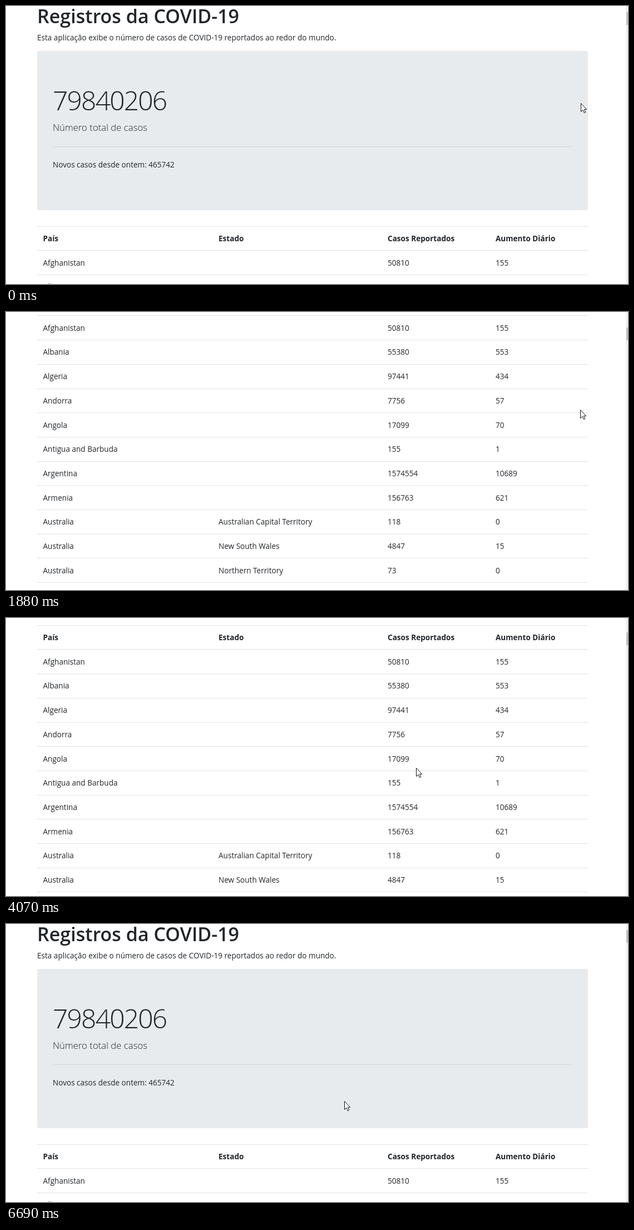
Animation of 1118x501 px, one loop 7320 ms. Source, as an HTML page:

```html
<!DOCTYPE html>
<html lang="pt">
<head>
<meta charset="utf-8">
<title>Registros da COVID-19</title>
<style>
html, body { margin: 0; width: 100%; height: 100%; overflow: hidden; background: #fff; }
svg { display: block; width: 1118px; height: 501px; }
text { font-family: "Open Sans", "Noto Sans", sans-serif; font-size: 13.57px; fill: #212529; white-space: pre; }
.title { font-size: 34px; font-weight: 600; }
.total { font-size: 48px; font-weight: 300; letter-spacing: -1.85px; }
.lead { font-size: 16.75px; font-weight: 300; }
.head { font-weight: 700; }
</style>
</head>
<body>
<svg viewBox="0 0 1118 501">
  <g id="page"></g>
  <rect x="1114" y="0" width="4" height="501" fill="#f1f1f1"/>
  <rect id="thumb" x="1115" width="3" height="23" fill="#c1c1c1"/>
  <path id="cursor" d="M.5 .5V15.5L4 12.2L6.4 17.6L8.7 16.6L6.4 11.3H10.6Z" fill="#fff" stroke="#111"/>
</svg>
<script>
const LOOP = 7320, REPAINT = 77.2;
const ROW = 43.7, TABLE_TOP = 397;
const COLS = [66.5, 382, 686, 880];

const ROWS = `Afghanistan||50810|155
Albania||55380|553
Algeria||97441|434
Andorra||7756|57
Angola||17099|70
Antigua and Barbuda||155|1
Argentina||1574554|10689
Armenia||156763|621
Australia|Australian Capital Territory|118|0
Australia|New South Wales|4847|15
Australia|Northern Territory|73|0
Australia|Queensland|1241|1
Australia|South Australia|569|1
Australia|Tasmania|234|0
Australia|Victoria|20361|0
Australia|Western Australia|854|6
Austria||349055|1851
Azerbaijan||211764|1703
Bahamas||7788|0
Bahrain||91304|234`.split('\n').map(line => line.split('|'));

// Start and number of repaints
const BURSTS = [[630, 6], [1260, 3], [1640, 7], [2280, 10], [3290, 45]];

// Wheel turns: from, till, page offset reached
const TURNS = [[590, 970, 200], [1200, 1410, 270], [1590, 2070, 551], [2210, 2690, 816], [3308, 4727, 0]];

// Pointer stops after the slow drift: time, x, y
const DRIFT_END = 3440;
const STOPS = [
  [DRIFT_END, 1023, 189], [4600, 487, 340], [4760, 477, 340], [5300, 213, 100],
  [5530, 242, 126], [6300, 517, 336], [6680, 608, 319]
];

const $ = id => document.getElementById(id);
const page = $('page');
const mix = (a, b, p) => a + (b - a) * p;
const progress = (t, from, till) => Math.min(1, Math.max(0, (t - from) / (till - from)));

function add(tag, attrs, text = '') {
  const node = document.createElementNS('http://www.w3.org/2000/svg', tag);
  for (const key in attrs) node.setAttribute(key, attrs[key]);
  node.textContent = text;
  page.append(node);
}
const label = (x, y, text, cls = '') => text && add('text', { x, y, class: cls }, text);
const rule = (x, y, width, fill) => add('rect', { x, y: Math.round(y), width, height: 1, fill });

function buildPage() {
  label(56, 31, 'Registros da COVID-19', 'title');
  label(56, 62, 'Esta aplicação exibe o número de casos de COVID-19 reportados ao redor do mundo.');
  add('rect', { x: 56, y: 81, width: 990, height: 287, rx: 4, fill: '#e8ebee' });
  label(84, 188, '79840206', 'total');
  label(84, 225, 'Número total de casos', 'lead');
  rule(84, 253, 934, '#d1d4d6');
  label(84, 291, 'Novos casos desde ontem: 465742');

  const table = [['País', 'Estado', 'Casos Reportados', 'Aumento Diário'], ...ROWS];
  table.forEach((cells, i) => {
    const top = TABLE_TOP + i * ROW;
    rule(56, top - 0.3, 990, '#dee2e6');
    cells.forEach((cell, c) => label(COLS[c], Math.round(top + 27), cell, i ? '' : 'head'));
  });
  rule(56, TABLE_TOP + table.length * ROW - 0.3, 990, '#dee2e6');
}

// Time of the latest repaint, on a 10 ms clock
function repaintTime(t) {
  const burst = BURSTS.findLast(([start]) => start <= t);
  if (!burst) return 0;
  const [start, count] = burst;
  const at = k => Math.floor((start + k * REPAINT) / 10) * 10;
  let k = 0;
  while (k + 1 < count && at(k + 1) <= t) k++;
  return at(k);
}

const scrollAt = t => TURNS.reduce(
  (offset, [from, till, to]) => mix(offset, to, progress(t, from, till)), 0);

function pointerAt(t) {
  const drift = progress(t, 630, DRIFT_END) ** 3;
  const begin = [mix(1033, 1023, drift), mix(175, 189, drift)];
  return STOPS.slice(1).reduce(([x, y], [till, toX, toY], i) => {
    const p = progress(t, STOPS[i][0], till);
    return [mix(x, toX, p), mix(y, toY, p)];
  }, begin).map(Math.round);
}

function draw(ms) {
  const t = repaintTime(ms % LOOP);
  const scroll = Math.round(scrollAt(t));
  page.setAttribute('transform', `translate(0 ${-scroll})`);
  $('thumb').setAttribute('y', Math.round(11 + scroll * 0.04));
  $('cursor').setAttribute('transform', `translate(${pointerAt(t)})`);
}

buildPage();
const begin = performance.now();
function tick() {
  draw(performance.now() - begin);
  requestAnimationFrame(tick);
}
tick();
</script>
</body>
</html>
```
